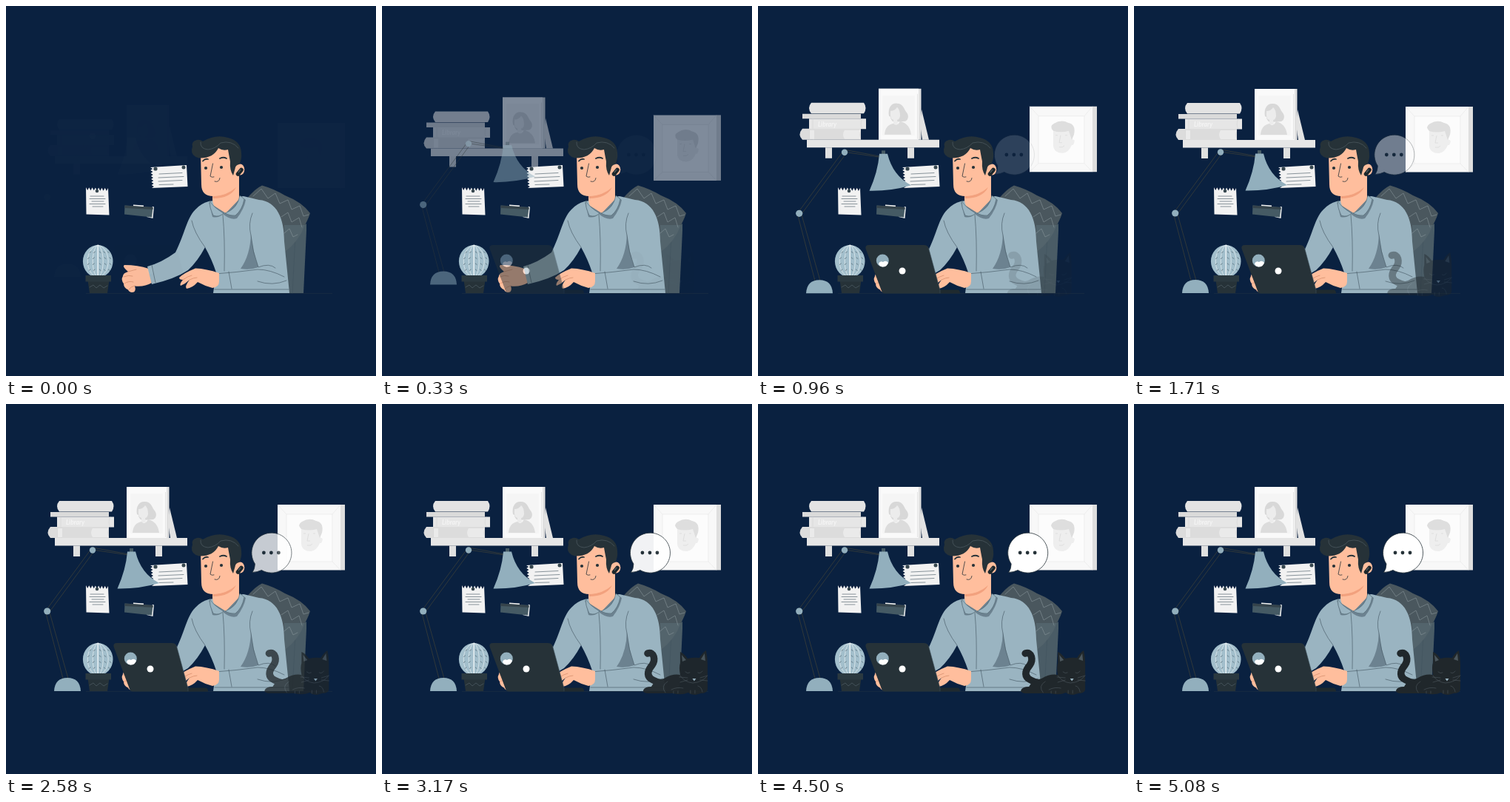
An HTML page that plays this animation: 500x500 px, repeating every 5.12 s.

```html
<!DOCTYPE html>
<html lang="en">
<head>
<meta charset="utf-8">
<title>Home office</title>
<style>
html, body { margin: 0; width: 100%; height: 100%; overflow: hidden; background: #0a2140; }
svg { display: block; width: 100%; height: 100%; }
.line { fill: none; stroke: #263238; stroke-width: .8; stroke-linecap: round; stroke-linejoin: round; }
.fold { fill: none; stroke: #40535e; stroke-width: .6; stroke-linecap: round; }
.thin { fill: none; stroke: #d4d4d4; stroke-width: .6; }
</style>
</head>
<body>
<svg viewBox="0 0 500 500">
  <path d="M108 388.4H441" stroke="#1b2c42" stroke-width=".8"/>

  <g id="shelf" opacity="0">
    <path d="M221 140L231 181H222L219 160Z" fill="#e3e3e3"/>
    <path d="M163 112H220.500V181H163Z" fill="#e0e0e0"/>
    <path d="M163 112H217V181H163Z" fill="#fafafa"/>
    <path d="M168 121H212V175H168Z" fill="#f5f5f5"/>
    <path class="thin" d="M215.500 119V180"/>
    <path d="M177 149C175 137 181 131 188 132C196 132 197 139 200 143C204 147 204 154 199 156L184 157C181 156 179 153 179 150Z" fill="#d8d8d8"/>
    <path d="M179 142Q185 142 188 137Q192 140 192 149Q191 154 188 154L189 160H183V154Q178 154 179 142Z" fill="#ececec"/>
    <path d="M171 174Q172 161 183 159Q188 164 192 156Q205 159 207 174Z" fill="#dcdcdc"/>
    <path d="M66 181H245V191.500H66Z" fill="#e6e6e6"/>
    <path d="M91 191.500H100V206H91ZM202 191.500H211V206H202Z" fill="#e0e0e0"/>
    <path d="M72 131H143Q148 138 143 145.500H72Q66 138 72 131Z" fill="#e3e3e3"/>
    <path d="M60 146H139V152.500H60Z" fill="#dadada"/>
    <path d="M69 152.500H146V166.500H69Z" fill="#e6e6e6"/>
    <path d="M60 166H139V181H60Q53 174 60 166Z" fill="#dcdcdc"/>
    <path d="M74 152.500V166M141 152.500Q137 160 141 166M70 167V181M75 167V181" class="thin"/>
    <path d="M70 168H76V180H70ZM117 168H139Q135 174 139 180H117Q113 174 117 168Z" fill="#eaeaea"/>
    <text x="81" y="163" font-family="Lato, sans-serif" font-style="italic" font-weight="700" font-size="8.500" fill="#f5f5f5">Library</text>
  </g>

  <g id="picture" opacity="0">
    <path d="M452 136H458V224.500H452Z" fill="#dedede"/>
    <path d="M367 136H452V224.500H367Z" fill="#f8f8f8"/>
    <path d="M379 149H441V213H379Z" fill="#fcfcfc"/>
    <path class="thin" d="M367 136L379 149H441V213H379V149M452 136L441 149M367 224.500L379 213M452 224.500L441 213" style="stroke:#e6e6e6"/>
    <path d="M399 166H425V181Q430 180 426 188H424Q420 198 412 199Q400 199 399 189Z" fill="#eee"/>
    <path d="M399 169Q393 163 400 159Q410 153 419 158Q430 160 427 174L424 181L420 169Q409 172 399 169Z" fill="#dedede"/>
    <path class="thin" d="M409 175L407 185H411M402 175H405M415 175H418M407 191Q412 192 414 189"/>
  </g>

  <g id="notes">
    <path id="noteA" fill="#f2f2f2"/>
    <path id="noteB" fill="#f2f2f2"/>
    <path class="fold" d="M114 257H132M113 260.500H134M116 264H132M113 267.500H134M117 271H131M207 227L238 225.500M206 232L240 230.500M206 237L238 235.500M207 241.500L226 241"/>
    <g fill="#37474f"><circle cx="123" cy="250" r="2.300"/><circle cx="202" cy="220" r="2.600"/><circle cx="240" cy="218" r="2.500"/></g>
    <path d="M172 268.500L186 269.500V274H172Z" fill="#eee"/>
    <path d="M198 271L200 271.500L198.500 287L190 285Z" fill="#e8eaeb"/>
    <path d="M160.500 269.500L198.500 272L197 285.500L160 281.500Z" fill="#455a64"/>
    <path d="M160.500 269.500L198.500 272V275L160.500 273Z" fill="#35434b"/>
  </g>

  <g id="lamp" opacity="0">
    <path class="line" style="stroke:#30383a;stroke-width:1" d="M54 279L115 196M58 282L119 199M54 283L77 371M59 282L84 371M117 197L165 204M117 194L166 203"/>
    <path d="M65 388Q66 370 83 370Q100 370 101 388Z" fill="#92afbd"/>
    <circle cx="55.700" cy="280" r="4.600" fill="#92afbd"/>
    <circle cx="117" cy="197.500" r="4.200" fill="#92afbd"/>
    <path d="M167 195H172V201H167Z" fill="#455a64"/>
    <path d="M164 199.500H175Q182 229 207 242Q180 250 150.500 249.500Q162 224 164 199.500Z" fill="#92afbd"/>
  </g>

  <g id="cactus">
    <ellipse cx="124.200" cy="345" rx="20.300" ry="22" fill="#a3bfcc"/>
    <g id="ribs" fill="none" stroke="#e9f1f4"/>
    <path id="spines" class="fold"/>
    <path d="M110.500 371H139.500L137 388H113Z" fill="#263238"/>
    <path d="M107.500 364H142V372.500H107.500Z" fill="#2b3940"/>
    <path d="M113 380L118 377L122 381L127 377L132 381L137 378" class="fold" style="stroke:#58676f"/>
  </g>

  <g id="chair">
    <path d="M374 318L406 294V304L402 388H380Z" fill="#4a5c66"/>
    <path d="M391 312L387 388" class="fold"/>
    <path d="M325 261Q336 247 346 242.500Q362 247 377 256Q400 265 411 280Q407 293 398 305Q390 322 376 333L350 290Z" fill="#4a575e"/>
    <path d="M376 296L404 296Q396 318 376 333Z" fill="#53646c"/>
    <path d="M334 257L345 247L354 260L364 253L370 267L381 262L386 275L397 270L402 284L409 282M372 285L381 279L386 292L396 286L400 299M376 307L383 301L388 312L394 309" class="fold" style="stroke:#88959b"/>
  </g>

  <g id="man">
    <path d="M160 350Q178 350 193 355L197 374Q187 380 174 378.500Q176 384 173 386.500Q167 388 165 383.500Q159 381 159 375Q155 370 158 365Q158 361 165 359Q158 353 159 351Z" fill="#ffbe9d"/>
    <path d="M159 366Q166 363 171 365M160 375Q166 371 172 373M166 383Q169 379 174 378M165 359L176 356" class="fold" style="stroke:#c98261"/>
    <path d="M274 264Q263 267 256 275C244 287 242 307 229 333Q210 347 191 352L197 376Q228 369 246 357Q259 345 269 326Q278 342 284 360L280 388H383L376 318C376 287 366 264 342 262Q334 260 321 257Z" fill="#9ab4c1"/>
    <path d="M331 308Q333 330 341 353Q331 357 317 355Q330 337 331 308Z" fill="#6c8290"/>
    <path d="M333 280Q327 294 331 310Q333 332 341 353Q356 347 364 354M293 282Q296 314 295 358M283 362Q311 360 340 356Q357 356 376 366M251 290Q254 306 269 326M197 350L202 374M282 383H382M340 372Q360 379 379 371M301 359L305 382" class="fold"/>
    <path d="M288 361Q271 355 256 354.500Q240 361 234 367Q234 370 239 370Q234 376 236 378Q243 375 248 370Q241 379 244 382Q252 381 259 373Q268 378 279 381Q288 380 288 372Z" fill="#ffbe9d"/>
    <path d="M239 370Q246 365 251 364M248 370Q254 367 258 367" class="fold" style="stroke:#c98261"/>
    <path d="M279 250L315 228V260Q312 276 296 282Q280 276 279 262Z" fill="#ffbe9d"/>
    <path d="M279 257Q298 257 311 245Q303 260 280 260Z" fill="#f2a17e"/>
    <path d="M274 265L279 285Q287 287 293 281Q304 290 312 287Q322 274 324 262L318 258L297 280L278 268Z" fill="#6c8290"/>
    <path d="M275 263Q280 272 294 280Q288 286 280 283Q275 273 275 263ZM316 256L322 261Q319 276 310 283Q303 284 296 280Q313 274 316 256Z" fill="#9ab4c1" stroke="#455a64" stroke-width=".5"/>
    <ellipse cx="316.500" cy="221" rx="5.800" ry="7.500" fill="#ffbe9d"/>
    <path d="M263 200L264 241Q264 257 280 257Q297 256 308 246L315 230V196Q290 185 263 200Z" fill="#ffbe9d"/>
    <path d="M252 190Q250 183 258 181Q262 180 266 183Q283 173 300 178Q317 182 318 198Q319 208 315 214Q310 215 309.500 220L307 229Q302 222 303 210Q301 200 300 194Q293 196 287 192Q280 206 261 205.500Q250 203 251 194Z" fill="#263238"/>
    <path d="M263 184Q262 193 273 194Q283 193 290 185Q305 181 314 192" class="fold" style="stroke:#56646b"/>
    <path d="M266 209.500Q269 206 273 207M289 206Q294 203.500 298 206" class="line" style="stroke-width:1.800"/>
    <circle cx="270" cy="219" r="2.100" fill="#263238"/><circle cx="291" cy="218" r="2.100" fill="#263238"/>
    <path d="M279.500 213L276 230Q278 232 281 231M282 237Q288 239 289 232.500" class="line"/>
    <path d="M313.500 227L318 221.500" stroke="#1d272c" stroke-width="5.500" stroke-linecap="round"/>
    <path d="M314 225L317 221" stroke="#77848a" stroke-width=".9"/>
  </g>

  <g id="laptop" opacity="0">
    <path d="M238 383.500H270Q273 384 273 388.500H238Z" fill="#1f2a2f"/>
    <path d="M150 323H224Q229 323 230.500 327L246 384V388.500H172Q168 388.500 167 385L145.500 328Q144.500 323 150 323Z" fill="#263238"/>
    <path d="M230.500 327L246 384V388" class="fold"/>
    <circle cx="168.300" cy="344" r="8.500" fill="#92afbd"/>
    <path d="M163 348Q165 344 169 346Q173 343 176 347Q174 353 168 352.500Q164 352 163 348Z" fill="#fff"/>
    <circle cx="195" cy="358" r="4.500" fill="#fff"/>
  </g>

  <g id="cat" opacity="0">
    <path d="M360 337C369 334 371 346 366 353C361 359 358 366 364 371Q371 376 383 378" fill="none" stroke="#20272b" stroke-width="9.500" stroke-linecap="round"/>
    <path d="M354 387Q356 382 365 382Q368 374 382 371Q394 364 404 366Q402 356 404 350L404 335Q409 337 414 344Q422 342 430 343Q434 336 439 333Q441 342 441 353V386Q440 391 432 391L425 393Q418 393 415 390Q406 394 394 391H361Q354 391 354 387Z" fill="#20272b"/>
    <path d="M406 339L412 346L407 348ZM437 337L432 345L438 347Z" fill="#4b565c"/>
    <path d="M404 367Q410 376 421 377Q434 376 440 368M384 390Q377 381 387 375M392 386Q400 382 408 384M395 388V391M401 388V391M418 387V391M424 387V391M428 381Q433 382 434 389M414 370L403 369M414 373L404 376M431 370L441 367M431 373L441 374M411 362Q414 365 417 363M428 363Q431 365 434 361" class="fold" style="stroke:#4d585e"/>
    <path d="M420.500 371H425.500L423 374.500Z" fill="#9ab4c1"/>
  </g>

  <g id="bubble" opacity="0">
    <path d="M341 216A27 27 0 1 1 350 224.500Q345 227 337.500 227.500Q341 223 341 216Z" fill="#fff" stroke="#263238" stroke-width=".8"/>
    <g fill="#263238"><circle cx="353" cy="201" r="2.400"/><circle cx="363" cy="201" r="2.400"/><circle cx="373" cy="201" r="2.400"/></g>
  </g>
</svg>
<script>
const LOOP = 5120, LEAD = 60, QUICK = 1040, SLOW = 5140;
const byId = id => document.getElementById(id);

// Torn-edge notes: a row of small teeth between two points.
function teeth(x1, y1, x2, y2, count, dx, dy) {
  let d = '';
  for (let i = 0; i <= count * 2; i++) {
    const k = i / (count * 2), tip = i % 2;
    d += `L${x1 + (x2 - x1) * k + dx * tip} ${y1 + (y2 - y1) * k + dy * tip}`;
  }
  return d;
}
byId('noteA').setAttribute('d', 'M139.500 282.500L108.500 281.500' + teeth(108, 245, 138, 246, 7, 0, 4) + 'Z');
byId('noteB').setAttribute('d', 'M244 215L245.500 244L197 246' + teeth(197, 246, 195, 218, 7, 3, 0) + 'Z');

let ribs = '', spines = '';
for (const r of [-14, -7, 0, 7, 14]) {
  const x = 124.2 + r * 1.33;
  ribs += `<path d="M124.200 323C${x} 328 ${x} 362 124.200 367" stroke-width="${r ? .7 : 1.5}"/>`;
  for (let i = 0; i < 4; i++) {
    const y = 332 + i * 8, bulge = Math.sqrt(1 - ((y - 345) / 22) ** 2);
    spines += `M${124.2 + r * bulge + 2} ${y}l${r < 0 ? -2 : 2} 1.500`;
  }
}
byId('ribs').innerHTML = ribs;
byId('spines').setAttribute('d', spines);

const bezier = (s, a, b) => 3 * (1 - s) ** 2 * s * a + 3 * (1 - s) * s * s * b + s ** 3;

// cubic-bezier(.36, -.01, .5, 1.38): ends with a slight overshoot
function ease(x) {
  if (x <= 0) return 0;
  if (x >= 1) return 1;
  let low = 0, high = 1;
  for (let i = 0; i < 24; i++) {
    const mid = (low + high) / 2;
    if (bezier(mid, .36, .5) < x) low = mid; else high = mid;
  }
  return bezier(low, -.01, 1.38);
}

function enter(id, progress, dx, dy) {
  const part = byId(id), left = 1 - progress;
  part.setAttribute('opacity', Math.max(0, Math.min(1, progress)));
  part.setAttribute('transform', `translate(${dx * left} ${dy * left})`);
}

function draw(time) {
  const quick = ease((time + LEAD) / QUICK), slow = ease((time + LEAD) / SLOW);
  enter('shelf', quick, 0, 22);
  enter('picture', quick, 0, 22);
  enter('lamp', quick, 0, -22);
  enter('laptop', quick, 0, 0);
  enter('cat', slow, -20, 0);
  enter('bubble', slow, -20, 0);
}

let start;
function tick(now) {
  start ??= now;
  draw((now - start) % LOOP);
  requestAnimationFrame(tick);
}
draw(0);
requestAnimationFrame(tick);
</script>
</body>
</html>
```
